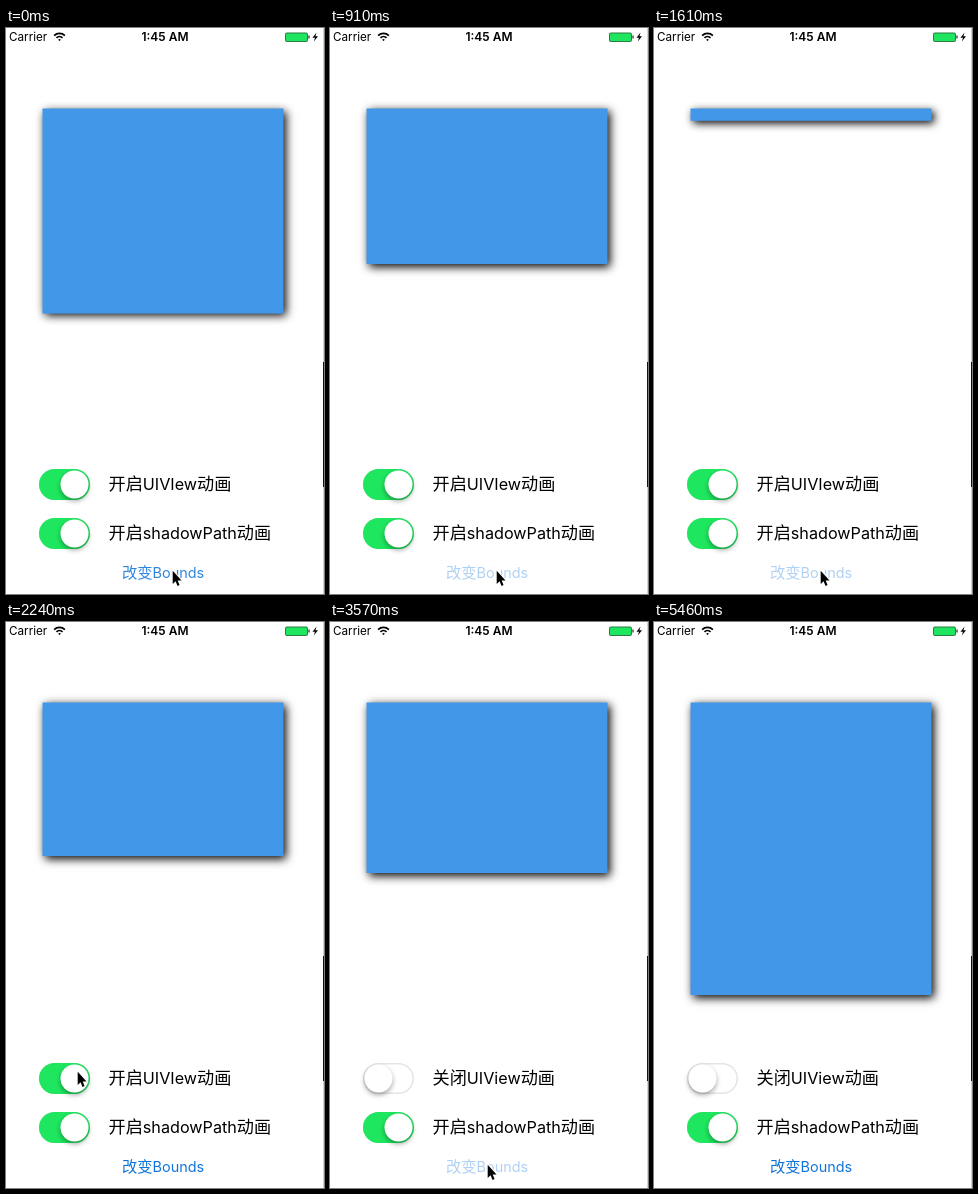
These frames come from a looping animation (318 px wide and 566 px high, 6440 ms). An HTML page with a canvas:

```html
<!DOCTYPE html>
<html lang="zh-CN">
<head>
<meta charset="utf-8">
<style>
html, body { margin: 0; height: 100%; overflow: hidden; background: #fff; }
canvas { display: block; }
</style>
</head>
<body>
<canvas id="stage" width="318" height="566"></canvas>
<script>
const ctx = document.getElementById('stage').getContext('2d');
const LOOP = 6440, STEP = 70, TOGGLE = 2310, LEAVE = 4970;
const MORPH = 440, HOLD = 140, FADE = 220, PRESSED = .33;
const GREEN = '#1fe65f', FIRST_HEIGHT = 292;
const LATIN = 'Inter, sans-serif';
const CJK = '"Noto Sans CJK SC", "Noto Sans CJK", sans-serif';
const ARROW = new Path2D('M0 0V14L3.2 11 5.4 16 7.6 15 5.5 10.2H9.8Z');
const BOLT = new Path2D('M310.5 4.5L306.5 9.7H309L307.8 13.5 312 8.2H309.4Z');

// The button is tapped in two steady rhythms, before and after the toggle
const series = (start, period, heights) =>
  heights.map((height, i) => ({ time: start + period * i, height }));
const taps = [
  ...series(-163, 572, [10, 155, 5, 153]),
  ...series(2870, 630, [108, 170, 292])
];

const clamp = x => Math.min(1, Math.max(0, x));
const smooth = x => (x = clamp(x), x * x * (3 - 2 * x));
const mix = (a, b, k) => a + (b - a) * k;

function boxHeight(t) {
  return taps.filter(tap => tap.time <= t).reduce((h, { time, height }) =>
    mix(h, height, time < TOGGLE ? smooth((t - time) / MORPH) : 1), FIRST_HEIGHT);
}

function buttonAlpha(t) {
  const { time } = taps.filter(tap => tap.time - HOLD <= t).pop();
  return mix(1, PRESSED, (1 - clamp((t - time - STEP) / FADE)) ** 3);
}

function pointerAt(t) {
  const away = smooth((t - 1680) / 490) - smooth((t - 2380) / 350);
  const leave = smooth((t - LEAVE) / (2 * STEP));
  const home = t < TOGGLE ? 166 : 157;
  return [mix(home, 71, away) + 11 * leave, mix(542, 449, away) - 32 * leave];
}

function rect(x, y, w, h, color) {
  ctx.fillStyle = color;
  ctx.fillRect(x, y, w, h);
}

function pill(x, y, w, h, r, color) {
  ctx.beginPath();
  ctx.roundRect(x, y, w, h, r);
  ctx.fillStyle = color;
  ctx.fill();
}

function shadow(dx, dy, blur, alpha) {
  ctx.shadowColor = `rgba(0,0,0,${alpha})`;
  ctx.shadowOffsetX = dx;
  ctx.shadowOffsetY = dy;
  ctx.shadowBlur = blur;
}

// Chinese and Latin runs are set in their own fonts
function label(str, x, y, size, color) {
  ctx.fillStyle = color;
  for (const run of str.match(/[ -~]+|[^ -~]+/g)) {
    ctx.font = run[0] < '~' ? `${size * .945}px ${LATIN}` : `${size}px ${CJK}`;
    ctx.fillText(run, x, y);
    x += ctx.measureText(run).width;
  }
}

function statusBar() {
  ctx.fillStyle = '#000';
  ctx.font = `11.7px ${LATIN}`;
  ctx.fillText('Carrier', 3, 13);
  ctx.font = `600 12px ${LATIN}`;
  ctx.textAlign = 'center';
  ctx.fillText('1:45 AM', 159, 13);
  ctx.textAlign = 'left';

  ctx.strokeStyle = '#000';
  ctx.lineWidth = 1.7;
  for (let i = 0; i < 3; i++) {
    ctx.beginPath();
    ctx.arc(53.5, 13, 1 + 3.3 * i, -Math.PI * .75, -Math.PI * .25);
    ctx.stroke();
  }

  pill(279, 4.5, 23, 9.5, 2, '#2a7a45');
  pill(280, 5.5, 21, 7.5, 1, GREEN);
  rect(302.5, 7.5, 1, 3, '#000');
  ctx.fill(BOLT);
}

function toggle(y, on) {
  pill(33, y, 51, 31, 15.5, '#e5e5e5');
  pill(34.5, y + 1.5, 48, 28, 14, '#fff');
  ctx.globalAlpha = on;
  pill(33, y, 51, 31, 15.5, GREEN);
  ctx.globalAlpha = 1;
  ctx.save();
  shadow(0, 2.5, 5, .35);
  pill(mix(34.5, 54.5, on), y + 1.5, 28, 28, 14, '#fff');
  ctx.restore();
}

function pointer(x, y) {
  ctx.save();
  ctx.translate(x + .7, y + .8);
  ctx.scale(.9, .95);
  ctx.lineWidth = 2.2;
  ctx.strokeStyle = '#fff';
  ctx.stroke(ARROW);
  ctx.fillStyle = '#000';
  ctx.fill(ARROW);
  ctx.restore();
}

function draw(t) {
  rect(0, 0, 318, 566, '#fff');
  rect(317, 0, 1, 566, '#d4d4d4');
  rect(317, 334, 1, 125, '#111');
  statusBar();

  ctx.save();
  shadow(2.5, 2.5, 9, 1);
  rect(36.5, 80.5, 241, boxHeight(t) + .5, '#4397e8');
  ctx.restore();

  toggle(441, 1 - smooth((t - TOGGLE) / 210));
  toggle(490, 1);
  label(t < TOGGLE ? '开启UIVIew动画' : '关闭UIView动画', 102.5, 462, 17.15, '#000');
  label('开启shadowPath动画', 102.5, 511, 17.15, '#000');
  ctx.globalAlpha = buttonAlpha(t);
  label('改变Bounds', 116, 549.5, 15.3, '#0f74da');
  ctx.globalAlpha = 1;

  if (t < LEAVE + 3 * STEP) pointer(...pointerAt(t));
}

const start = performance.now();
function frame() {
  const t = (performance.now() - start) % LOOP;
  draw(Math.floor(t / STEP) * STEP);
  requestAnimationFrame(frame);
}
frame();
</script>
</body>
</html>
```
